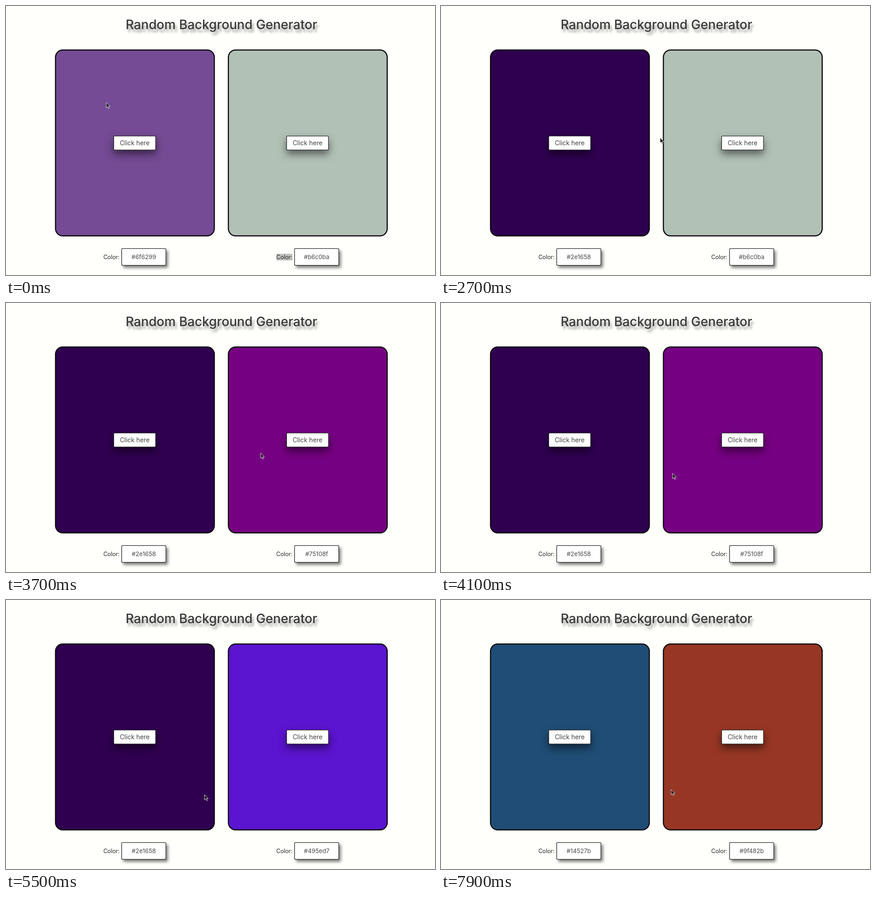
Recreate the animation shown at these times as an HTML page. Size 945 by 593 pixels, loop 8 s.

```html
<!DOCTYPE html>
<html lang="en">
<head>
<meta charset="utf-8">
<title>Random Background Generator</title>
<style>
  html, body { margin: 0; width: 100%; height: 100%; overflow: hidden; background: #fffffb; }
  svg { display: block; font-family: Inter, sans-serif; text-anchor: middle; }
  .title { font-size: 28.15px; font-weight: 500; fill: #383838; text-shadow: 4px 7px 5px rgba(0, 0, 0, .36); }
  .panel { stroke: #0d0b0e; stroke-width: 2.5px; }
  .button, .box { fill: #fff; stroke: #262626; stroke-width: 1.3px; }
  .button { filter: drop-shadow(0 9px 8.5px rgba(0, 0, 0, .5)); }
  .box { filter: drop-shadow(4px 5px 3px rgba(0, 0, 0, .5)); }
  .caption { font-size: 13.9px; fill: #443e3e; }
  .label { font-size: 12.6px; fill: #222; }
  .code { font-size: 13.2px; fill: #484848; }
  .mark { fill: #c3c3c1; }
</style>
</head>
<body>
<svg id="stage" width="945" height="593" viewBox="0 0 945 593">
  <text class="title" x="474.5" y="51">Random Background Generator</text>
  <path id="cursor" d="M0 0V11.8L2.7 9.3L4.6 13.6L6.4 12.8L4.6 8.7H8.2Z" fill="#151515" stroke="#eee" stroke-width=".9"/>
</svg>
<script>
  const LOOP = 8000, TICK = 100, DESELECT = 700;
  const stage = document.getElementById('stage');
  const cursor = document.getElementById('cursor');

  // Each click: [time, fill, printed code if it differs]
  const sides = [
    makeSide(0, [
      [0, '#744b94', '#6f6299'], [800, '#5e7284'], [1900, '#2f0050', '#2e1658'],
      [6300, '#61687c'], [7200, '#1f4d75', '#14527b']
    ]),
    makeSide(380.8, [
      [0, '#b2c1b6', '#b6c0ba'], [3100, '#24869b', '#24829e'], [3600, '#760082', '#75108f'],
      [4800, '#9890e2', '#91a4e7'], [5100, '#5b14cf', '#495ed7'], [7700, '#973624', '#9f482b']
    ])
  ];

  // Each pointer move: [start, end, x, y]
  const home = [221, 212.5];
  const moves = [
    [1200, 1500, 272, 220], [2200, 2500, 457, 293.5], [2500, 3200, 587, 277.5],
    [3200, 3700, 561, 330.5], [3700, 4400, 477, 404.5], [5100, 6000, 382, 463], [7500, 7900, 507, 417.5]
  ];

  function makeSide(x, clicks) {
    const g = document.createElementNS('http://www.w3.org/2000/svg', 'g');
    g.setAttribute('transform', `translate(${x} 0)`);
    g.innerHTML = `
      <rect class="panel" x="109.1" y="97" width="349.8" height="409.8" rx="16"/>
      <rect class="button" x="237.4" y="286.7" width="92.2" height="30.6" rx="2"/>
      <text class="caption" x="283.5" y="306.5">Click here</text>
      <rect class="mark" x="215" y="546" width="35" height="15"/>
      <text class="label" x="232.3" y="557.5">Color:</text>
      <rect class="box" x="254.8" y="534.6" width="97.4" height="37" rx="2"/>
      <text class="code" x="303.6" y="557.5"></text>`;
    stage.insertBefore(g, cursor);
    const part = name => g.querySelector('.' + name);
    return { clicks, panel: part('panel'), mark: part('mark'), code: part('code') };
  }

  const ease = k => k * k * (3 - 2 * k);

  function pointerAt(t) {
    let [x, y] = home;
    for (const [start, end, toX, toY] of moves) {
      const k = ease(Math.min(1, Math.max(0, (t - start) / (end - start))));
      x += (toX - x) * k;
      y += (toY - y) * k;
    }
    return [x, y];
  }

  function draw(now) {
    const t = Math.floor(now % LOOP / TICK) * TICK;
    for (const { clicks, panel, mark, code } of sides) {
      const [, fill, hex = fill] = clicks.filter(c => c[0] <= t).pop();
      panel.style.fill = fill;
      code.textContent = hex;
      mark.style.opacity = mark === sides[1].mark && t < DESELECT ? 1 : 0;
    }
    cursor.setAttribute('transform', `translate(${pointerAt(t)})`);
  }

  const begin = performance.now();
  function frame() {
    draw(performance.now() - begin);
    requestAnimationFrame(frame);
  }
  frame();
</script>
</body>
</html>
```
